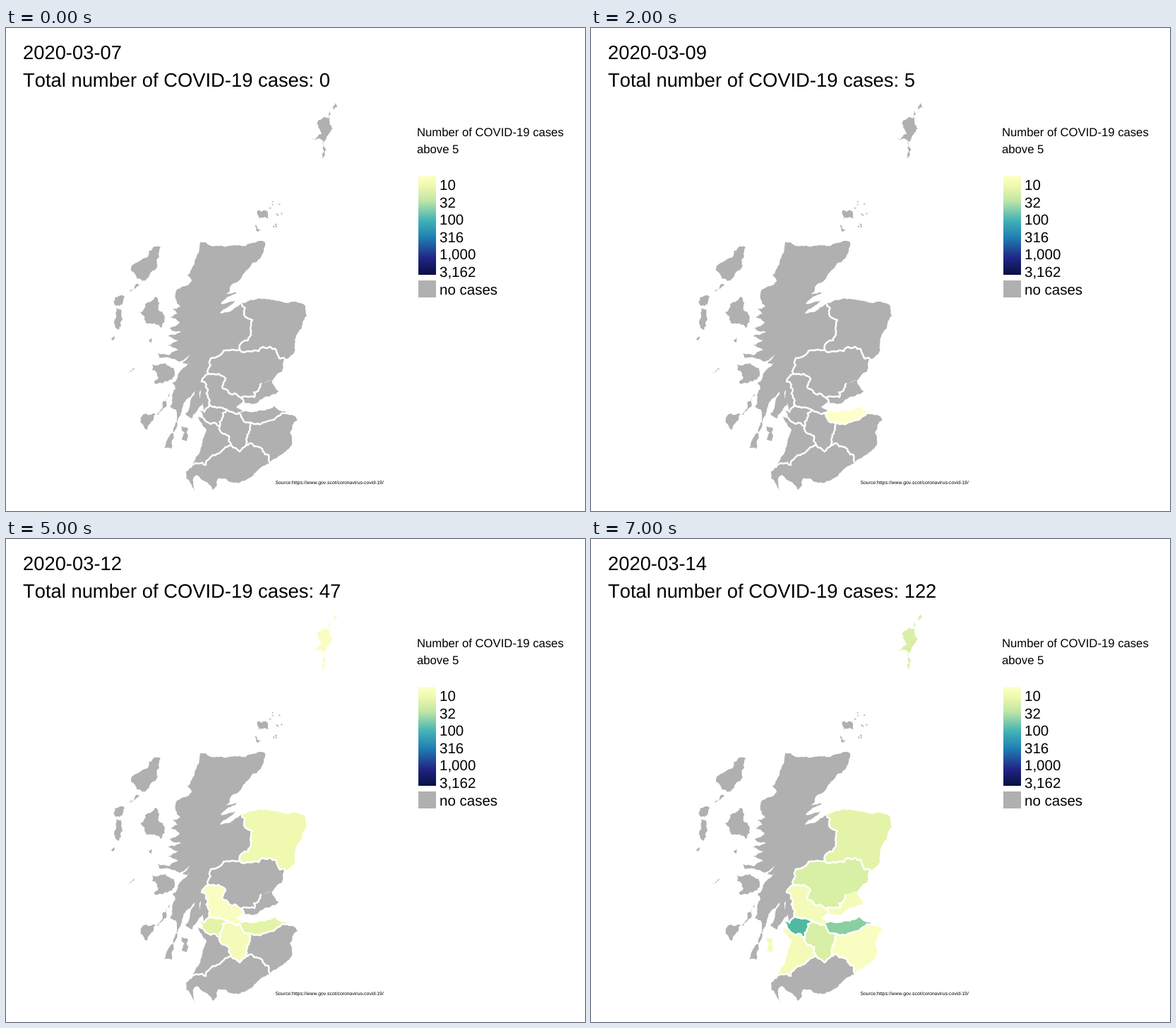
Animation of 820x683 px, one loop 8000 ms. Source, as an HTML page:

```html
<!DOCTYPE html>
<html lang="en">
<head>
<meta charset="utf-8">
<title>COVID-19 cases by health board</title>
<style>
  html, body { margin: 0; width: 100%; height: 100%; overflow: hidden; background: #fff; }
  svg { display: block; width: 820px; height: 683px; }
  text { font-family: "Liberation Sans", Arial, sans-serif; font-kerning: none; text-rendering: geometricPrecision; }
  .title { font-size: 27.36px; }
  .legend { font-size: 16.7px; }
  .label { font-size: 20.5px; }
  .source { font-size: 6.84px; }
  .border { fill: none; stroke: #fff; stroke-width: 2.5; stroke-linejoin: round; stroke-linecap: round; }
</style>
</head>
<body>
<svg viewBox="0 0 820 683" xmlns="http://www.w3.org/2000/svg">
  <defs>
    <linearGradient id="scale" x1="0" y1="0" x2="0" y2="1">
      <stop offset="0" stop-color="#ffffcc"/>
      <stop offset=".1" stop-color="#eff9ad"/>
      <stop offset=".25" stop-color="#c0e6a5"/>
      <stop offset=".45" stop-color="#43b2b6"/>
      <stop offset=".62" stop-color="#2080b4"/>
      <stop offset=".83" stop-color="#212586"/>
      <stop offset="1" stop-color="#081040"/>
    </linearGradient>
  </defs>
  <g id="map"></g>
  <text id="date" class="title" x="24" y="44"></text>
  <text id="total" class="title" x="24" y="83"></text>
  <text class="legend" x="582" y="152.5">Number of COVID-19 cases</text>
  <text class="legend" x="582" y="176.5">above 5</text>
  <rect x="584" y="209" width="25" height="140" fill="url(#scale)"/>
  <rect x="584" y="357" width="25" height="24" fill="#b0b0b0"/>
  <g id="labels"></g>
  <text class="source" x="381.5" y="645.3">Source:https://www.gov.scot/coronavirus-covid-19/</text>
</svg>
<script>
const GREY = '#b0b0b0';
const byId = id => document.getElementById(id);

function add(parent, tag, attrs) {
  const el = document.createElementNS('http://www.w3.org/2000/svg', tag);
  for (const key in attrs) el.setAttribute(key, attrs[key]);
  parent.appendChild(el);
  return el;
}

let seed = 7;
function rand() {
  seed = (seed * 16807) % 2147483647;
  return seed / 2147483647;
}

// Midpoint displacement: turns a few key points into a ragged line
function split(a, b, amp) {
  const dx = b[0] - a[0], dy = b[1] - a[1];
  if (Math.hypot(dx, dy) < 4) return [b];
  const shift = (rand() - .5) * amp;
  const mid = [(a[0] + b[0]) / 2 - dy * shift, (a[1] + b[1]) / 2 + dx * shift];
  return [...split(a, mid, amp), ...split(mid, b, amp)];
}

function rough(text, amp) {
  const points = text.split(' ').map(pair => pair.split(',').map(Number));
  return points.flatMap((p, i) => i ? split(points[i - 1], p, amp) : [p]);
}

const plain = points => points.map(p => p.map(v => v.toFixed(1)).join()).join(' ');
const closed = points => `M${plain(points)}Z`;

// Key points of the borders shared by two boards
const borders = {
  hiGr: '333,389 337,405 349,413 347,434 335,444 331,455',
  grTa: '331,455 358,457 364,451 382,454 387,467 395,468',
  hiTa: '331,455 319,455 301,464 290,467 285,486 287,489',
  taFo: '287,489 301,489 311,496 306,507 319,518 333,523',
  taFi: '333,523 340,521 352,522 351,515 361,503',
  foFi: '333,523 337,529 334,531',
  foLa: '330,544 320,543 313,540',
  foGl: '313,540 298,537 288,532',
  hiFo: '288,532 286,512 277,500 287,489',
  hiGl: '288,532 281,543',
  glAy: '280,552 290,560 303,563',
  glLa: '303,563 306,552 313,540',
  laAy: '303,563 308,574 316,577 319,590',
  laDu: '319,590 331,599 340,590',
  laBo: '340,590 344,571 345,558',
  laLo: '345,558 336,555 330,544',
  loBo: '398,545 385,549 361,560 345,558',
  boDu: '374,615 372,604 356,592 340,590',
  duAy: '262,621 283,618 299,602 319,590'
};

const coasts = {
  gr: '395,468 407,461 409,449 414,430 426,407 424,393 400,389 350,385 333,389',
  ta: '395,468 391,486 361,503',
  fi: '361,503 376,498 386,514 366,522 354,531 334,531',
  fo: '334,531 326,536 336,541 330,544',
  gl: '281,543 274,541 280,552',
  lo: '330,544 350,543 366,541 380,534 398,545',
  bo: '398,545 413,554 402,572 405,584 374,615',
  du: '374,615 345,636 322,643 300,637 293,653 282,641 270,632 265,637 268,655 255,637 255,627 262,621',
  ay: '280,552 272,549 284,568 278,587 273,603 262,621',
  north: '333,389 318,401 303,404 320,391 325,385 304,390 327,374 311,377 322,361 340,343 360,326 367,303 349,304 308,309 290,308 283,303 275,303',
  west: '275,303 273,318 267,333 257,349 263,358 243,369 240,383 247,394 236,397 243,404 233,409 246,416 232,424 248,430 229,436 244,441 229,449 246,456 215,460 217,466 246,472 264,458',
  south: '264,458 250,474 268,470 244,489 236,502 240,510 232,536 241,540 224,594 234,595 251,534 268,514 254,546 264,552 276,512 272,541 279,531 281,543'
};

const islands = {
  hi: [
    '219,310 217,323 208,343 186,355 177,343 184,332', '184,362 189,364 175,373',
    '154,381 168,380 161,393 153,389', '156,396 163,398 160,427 155,424', '149,440 154,436 151,442',
    '211,380 217,400 224,406 219,424 190,402 197,390', '202,441 207,438 206,445',
    '171,487 182,480 175,487', '206,475 231,478 239,488 210,502 214,488',
    '232,517 224,537 212,548 222,528', '198,545 212,546 200,568 191,558',
    '356,258 368,258 373,270 357,271', '353,278 361,285 356,288'
  ],
  ay: ['248,563 258,567 256,584 249,582'],
  sh: [
    '466,106 469,112 464,116', '458,117 460,122 457,129',
    '443,130 459,126 454,156 449,187 448,158 432,157 447,150'
  ]
};

// A leading minus walks the line backwards
const outlines = {
  hi: 'north west south -hiGl hiFo -hiTa -hiGr',
  gr: 'hiGr grTa gr',
  ta: 'grTa ta -taFi -taFo -hiTa',
  fi: 'taFi fi -foFi',
  fo: 'taFo foFi fo foLa foGl hiFo',
  gl: 'foGl hiGl gl glAy glLa',
  la: 'foLa -glLa laAy laDu laBo laLo',
  lo: 'lo loBo laLo',
  bo: 'bo boDu laBo -loBo',
  du: '-boDu du duAy laDu',
  ay: 'ay duAy -laAy -glAy',
  sh: ''
};

const lines = {};
for (const key in borders) lines[key] = rough(borders[key], .45);
for (const key in coasts) lines[key] = rough(coasts[key], .3);
const walk = key => key[0] === '-' ? [...lines[key.slice(1)]].reverse() : lines[key];

// Scattered islets of the northern archipelago
function islets(count) {
  return Array.from({ length: count }, () => {
    const x = 370 + rand() * 21, y = 243 + rand() * 45;
    return [[x, y], [x + 1 + rand() * 3, y + 1], [x + 1, y + 2 + rand() * 2]];
  });
}

const map = byId('map');
const boards = {};
for (const id in outlines) {
  const shapes = (islands[id] || []).map(text => rough(text + ' ' + text.split(' ')[0], .5));
  if (outlines[id]) shapes.push(outlines[id].split(' ').flatMap(walk));
  if (id === 'hi') shapes.push(...islets(10));
  boards[id] = add(map, 'path', { d: shapes.map(closed).join('') });
}
for (const id in borders) add(map, 'polyline', { points: plain(lines[id]), class: 'border' });

['10', '32', '100', '316', '1,000', '3,162', 'no cases'].forEach((label, i) => {
  add(byId('labels'), 'text', { x: 614, y: 229 + i * 24.6, class: 'label' }).textContent = label;
});

const ramp = [[255, 255, 204], [236, 247, 168], [169, 220, 160], [79, 185, 161]];

// Logarithmic colour scale from 5 to 31 cases
function shade(cases) {
  if (!cases) return GREY;
  const level = Math.log(cases / 5) / Math.log(31 / 5) * (ramp.length - 1);
  const i = Math.min(Math.floor(level), ramp.length - 2);
  return `rgb(${ramp[i].map((c, k) => Math.round(c + (ramp[i + 1][k] - c) * (level - i)))})`;
}

const STEP = 1000;
const days = [
  {},
  {},
  { lo: 5 },
  { lo: 7, gr: 6 },
  { lo: 8, gr: 6, gl: 7, sh: 6 },
  { lo: 10, gr: 8, gl: 10, la: 7, fo: 6, sh: 6 },
  { lo: 18, gr: 10, gl: 18, la: 8, fo: 6, sh: 9 },
  { lo: 21, gr: 10, gl: 31, la: 11, ta: 11, sh: 11, fo: 7, fi: 7, ay: 7, bo: 6 }
];

let shown = -1;
function show(i) {
  if (i === shown) return;
  shown = i;
  const total = Object.values(days[i]).reduce((sum, n) => sum + n, 0);
  byId('date').textContent = '2020-03-' + String(7 + i).padStart(2, '0');
  byId('total').textContent = 'Total number of COVID-19 cases: ' + total;
  for (const id in boards) boards[id].setAttribute('fill', shade(days[i][id]));
}

function tick() {
  show(Math.floor(performance.now() / STEP) % days.length);
  requestAnimationFrame(tick);
}
tick();
</script>
</body>
</html>
```
